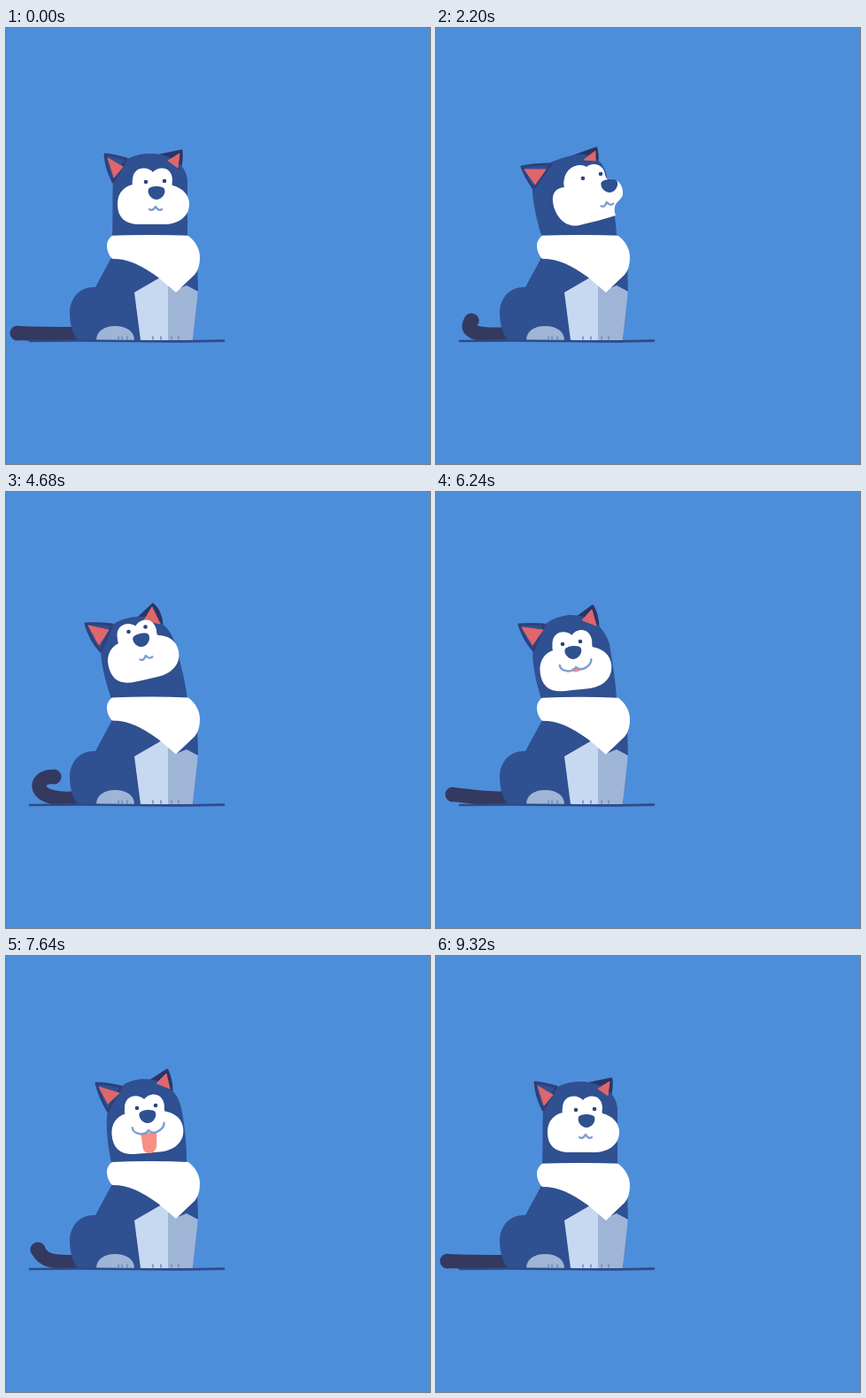
These frames come from a looping animation (479x493 px, 9.44 s). An HTML page:

```html
<!DOCTYPE html>
<html lang="en">
<head>
<meta charset="utf-8">
<title>Sitting dog</title>
<style>
  html, body { margin: 0; width: 100%; height: 100%; overflow: hidden; background: #4d8edb; }
  svg { display: block; width: 479px; height: 493px; }
  .coat { fill: #2f5091; }
  .ear { stroke-width: 3; stroke-linejoin: round; }
  .red { fill: #df666d; stroke: #df666d; stroke-width: 1; stroke-linejoin: round; }
  .line { fill: none; stroke-linecap: round; stroke-linejoin: round; }
</style>
</head>
<body>
<svg viewBox="0 0 479 493">
  <path id="tail" class="line" stroke="#343960" stroke-width="16"/>
  <circle id="tip" r="8.6" fill="#343960"/>

  <path class="coat" d="M121 256L101 293C85 292 72 304 72 322C72 337 76 347 82 354H211L217 297L216 266Z"/>
  <path fill="#c7d9f1" d="M145 299L176 281L183 286V353H152Z"/>
  <path fill="#9fb5d6" d="M183 284L192 296L204 291L217 298L211 353H183Z"/>
  <path fill="#9fb5d6" d="M102 353C102 343 111 337 123 337C136 337 145 343 145 353Z"/>
  <path class="line" stroke="#2f4a88" stroke-width="2.7" d="M27 354Q80 353 140 354T246 353.6"/>
  <path class="line" stroke="#6f8dc0" stroke-width="1.6" d="M127 349v3M131 349v3M137 349v3M166 349v3M175 349v3M187 349v3M195 349v3"/>

  <path id="earR" class="ear" fill="#2b3563" stroke="#2b3563"/>
  <path id="head" class="coat"/>
  <path id="earL" class="ear coat" stroke="#2e4079"/>
  <path id="redL" class="red"/>
  <path id="redR" class="red"/>
  <g id="face"><path id="mask" fill="#fff" transform="translate(-166.5 -200)"/></g>
  <circle id="eyeL" r="2.3" fill="#2f4478"/>
  <circle id="eyeR" r="2.3" fill="#2f4478"/>
  <path id="nose" class="coat" d="M-9 -4C-7 -8 7 -8 9 -4C11 1 6 8 0 8C-6 8 -11 1 -9 -4Z"/>
  <g id="mouth">
    <path id="tongue" fill="#f98f82"/>
    <path id="lips" class="line" stroke="#7d9dd2" stroke-width="2.4"/>
  </g>
  <path id="scarf" fill="#fff" d="M120 235Q163 233 206 235C214 241 219 250 219 259C219 268 217 274 213 279L192 299L172 282C152 268 139 261 120 261C116 257 114 251 114 246C114 241 117 237 120 235Z"/>
</svg>
<script>
const LOOP = 9440, STEP = 40;

const ROUND = 'M166 163C172 156 187 156 188 171C188 174 187 176 188 178C200 181 207 189 207 199C207 214 194 222 178 222C170 222 160 222 152 222C134 222 126 214 126 199C126 186 134 179 143 177C142 175 143 173 143 171C144 156 160 156 166 163Z';
const PROFILE = 'M170 157C177 151 190 154 191 166C192 169 193 171 195 171C206 168 212 180 211 188C210 196 198 196 203 212C190 216 175 220 162 223C144 227 133 209 132 196C131 186 136 181 145 180C144 177 144 174 145 170C148 156 163 152 170 157Z';
const SMALL = 'M-7 2C-4 4 -2 2 0 -1C2 2 4 4 7 2';
const SMILE = 'M-18 -3C-18 4 -5 8 0 1C5 8 18 1 18 -6';
const NO_TONGUE = 'M-4 1L4 1L3 1C3 1 -3 1 -3 1Z';

const at = (x, y, turn = 0, tall = 1) => `translate(${x} ${y}) rotate(${turn}) scale(1 ${tall})`;

const front = {
  tail: 'M82 346C60 346 40 346 13 345', tip: at(13, 345),
  head: 'M120 234C121 210 120 190 121 172C123 152 142 142 163 142C184 142 203 152 205 172C205 192 205 212 205 234Z',
  earL: 'M112 143Q122 144 136 148L121 174Q113 158 112 143Z', redL: 'M115 147L132 157L122 169Z',
  earR: 'M198 139Q199 150 196 159L174 144Z', redR: 'M196 142L183 150L194 158Z',
  face: at(166.5, 200), mask: ROUND,
  eyeL: at(158, 174), eyeR: at(179, 173), nose: at(170, 186),
  mouth: at(169, 203), lips: SMALL, tongue: NO_TONGUE, scarf: at(0, 0)
};
const lookUp = {
  tail: 'M82 346C50 348 30 345 40 331', tip: at(40, 331),
  head: 'M119 234C113 215 108 190 109 178C112 158 130 150 150 145C172 138 190 148 193 168C198 190 203 212 204 234Z',
  earL: 'M97 157Q110 154 130 154L110 181Q101 168 97 157Z', redL: 'M100 160L124 160L112 177Z',
  earR: 'M181 136Q183 145 182 153L156 145Z', redR: 'M180 139L167 149L180 150Z',
  face: at(166.5, 200), mask: PROFILE,
  eyeL: at(166, 170), eyeR: at(186, 165), nose: at(196, 178, -8),
  mouth: at(193, 198, -12), lips: SMALL, tongue: NO_TONGUE, scarf: at(0, 0)
};
const tilt = {
  tail: 'M82 346C25 352 29 320 54 322', tip: at(54, 322),
  head: 'M119 234C113 215 105 190 108 172C109 152 130 142 148 141C170 139 184 152 190 168C196 190 202 210 205 234Z',
  earL: 'M90 151Q104 149 120 151L107 181Q96 168 90 151Z', redL: 'M93 154L116 157L105 174Z',
  earR: 'M166 128Q175 136 176 151L149 144Z', redR: 'M165 131L156 145L174 150Z',
  face: at(156, 190, -13, 1.04), mask: ROUND,
  eyeL: at(139, 159), eyeR: at(158, 154), nose: at(154.5, 168, -13),
  mouth: at(159, 187, -13), lips: SMALL, tongue: NO_TONGUE, scarf: at(0, -1.5)
};
const tiltUp = {
  ...tilt,
  tail: 'M82 346C26 352 30 320 54 322',
  earL: 'M90 149Q104 148 120 150L107 180Q95 167 90 149Z', redL: 'M93 151L116 156L105 173Z',
  earR: 'M166 127Q175 135 176 150L149 143Z', redR: 'M165 130L156 145L174 149Z',
  face: at(155.5, 189, -13, 1.04),
  eyeL: at(138.5, 158), eyeR: at(157.5, 152.5), nose: at(153, 167, -13),
  mouth: at(158, 186, -13), scarf: at(0, -2.5)
};
const smile = {
  tail: 'M82 346C60 348 40 344 19 342', tip: at(19, 342),
  head: 'M119 234C113 215 107 190 110 172C111 152 134 140 152 139C174 139 190 152 196 172C199 192 203 212 204 234Z',
  earL: 'M94 150Q106 149 122 150L110 179Q99 166 94 150Z', redL: 'M97 153L121 156L109 173Z',
  earR: 'M177 129Q183 140 183 154L158 143Z', redR: 'M176 133L165 145L181 151Z',
  face: at(158, 200.5, -6, 1.05), mask: ROUND,
  eyeL: at(143, 172), eyeR: at(163, 169), nose: at(155, 181, -6),
  mouth: at(158, 197, -6), lips: SMILE, tongue: 'M-5 2L5 2L4 5C3 7 -3 7 -4 5Z', scarf: at(0, -2.3)
};
const pant = {
  tail: 'M82 346C55 346 42 346 36 332', tip: at(36, 332),
  head: 'M119 234C115 215 112 190 115 172C117 152 136 140 155 139C178 139 194 152 198 172C202 192 204 212 204 234Z',
  earL: 'M102 144Q114 144 130 148L115 175Q106 160 102 144Z', redL: 'M105 148L128 155L115 167Z',
  earR: 'M182 129Q187 140 187 152L162 142Z', redR: 'M181 133L170 144L185 150Z',
  face: at(160, 200, -5, 1.03), mask: ROUND,
  eyeL: at(148, 172), eyeR: at(169, 169), nose: at(160, 181, -5),
  mouth: at(161, 196, -4), lips: SMILE, tongue: 'M-9 4L9 4L8 18C7 30 -9 30 -8 18Z', scarf: at(0, -2)
};

const keys = [
  [0, front], [1200, front], [1760, lookUp], [2600, lookUp], [3240, tilt], [3680, tilt],
  [4680, tiltUp], [4960, tiltUp], [5640, smile], [6400, smile], [7000, pant],
  [8120, pant], [8840, front], [LOOP, front]
];

const parts = Object.keys(front).map(id => {
  const node = document.getElementById(id);
  const moved = front[id].startsWith('translate');
  return { id, node, attr: moved ? 'transform' : 'd' };
});

const NUM = /-?\d+(\.\d+)?/g;
function mix(a, b, k) {
  if (a === b) return a;
  const to = b.match(NUM);
  let i = 0;
  return a.replace(NUM, n => (+n + (to[i++] - n) * k).toFixed(3));
}

const ease = k => k * k * (3 - 2 * k);

function draw(ms) {
  const t = Math.floor(ms % LOOP / STEP) * STEP;
  const i = keys.findIndex(key => key[0] > t);
  const [t0, from] = keys[i - 1], [t1, to] = keys[i];
  const k = ease((t - t0) / (t1 - t0));
  for (const { id, node, attr } of parts) node.setAttribute(attr, mix(from[id], to[id], k));
}

const start = performance.now();
function tick() {
  draw(performance.now() - start);
  requestAnimationFrame(tick);
}
tick();
</script>
</body>
</html>
```
